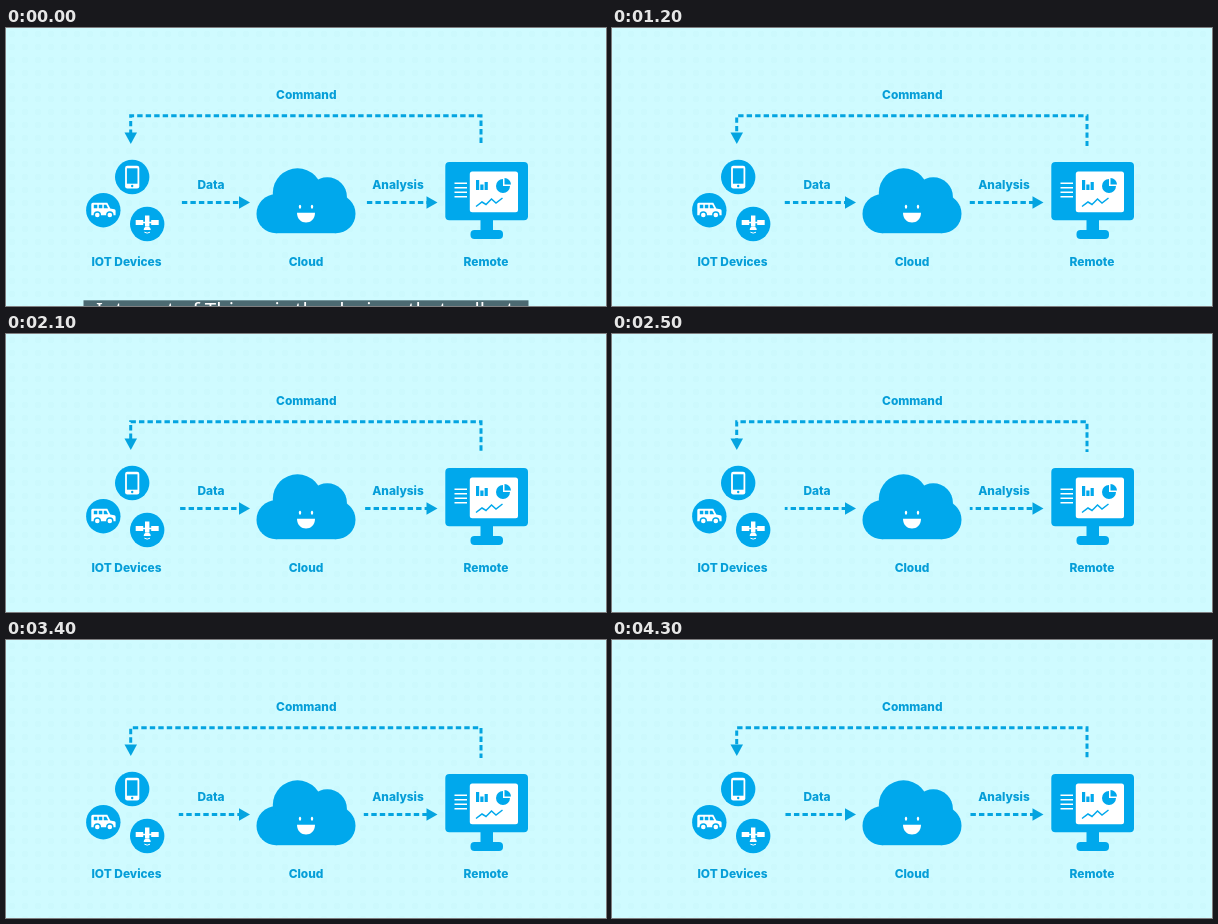
Write an HTML page that moves like this. It is 600 px wide and 278 px high and loops after 4400 ms.

```html
<!DOCTYPE html>
<html lang="en">
<head>
<meta charset="utf-8">
<title>Device data flow</title>
<style>
  :root { --blue: #00a8ec; --line: #04a4e0; --pale: #cffbff; }
  html, body { margin: 0; width: 100%; height: 100%; overflow: hidden; background: var(--pale); }
  svg { display: block; width: 100vw; height: 100vh; }
  .label { font: 800 11.9px Inter, sans-serif; fill: #069ed8; text-anchor: middle; }
  .blue { fill: var(--blue); }
  .white { fill: #fff; }
  .flow {
    fill: none; stroke: var(--line); stroke-width: 3;
    stroke-dasharray: 5.4 3.1;
    animation: flow 4.4s steps(44) infinite;
  }
  .head { fill: var(--line); }
  .caption { animation: caption 4.4s step-end infinite; }
  .caption text { font: 20.5px "Noto Sans", sans-serif; fill: #fff; }
  @keyframes flow {
    from { stroke-dashoffset: -3.1px; }
    to { stroke-dashoffset: -52.8px; }
  }
  @keyframes caption {
    0% { opacity: 1; }
    2.27%, 100% { opacity: 0; }
  }
</style>
</head>
<body>
<svg viewBox="0 0 600 278">
  <defs>
    <pattern id="weave" width="13" height="13" patternUnits="userSpaceOnUse">
      <rect x="3" y="3" width="6" height="6" rx="2" fill="#c9f7fc" opacity=".45"/>
    </pattern>
  </defs>
  <rect width="600" height="278" fill="#cffbff"/>
  <rect width="600" height="278" fill="url(#weave)"/>

  <!-- Connections -->
  <path class="flow" d="M475 118V87.8H124.7V105"/>
  <path class="flow" d="M172.8 174.5H234"/>
  <path class="flow" d="M357.8 174.5H421"/>
  <path class="head" d="M118.5 104.5H131L124.800 116z"/>
  <path class="head" d="M233 168.300v12.400l11-6.200z"/>
  <path class="head" d="M420.500 168.300v12.400l11-6.200z"/>

  <!-- Phone -->
  <g transform="translate(126.2 149)">
    <circle class="blue" r="17.2"/>
    <rect class="white" x="-7.1" y="-11.3" width="14.2" height="22.8" rx="2.2"/>
    <rect class="blue" x="-5.3" y="-8.7" width="10.6" height="15.4"/>
    <circle class="blue" cy="9" r="1.2"/>
  </g>

  <!-- Car -->
  <g transform="translate(97.3 182.2)">
    <circle class="blue" r="17.2"/>
    <path class="white" d="M-10.5-7.5H4L7-1.8 11-1q1.300.300 1.300 1.500V5H-12V-6q0-1.500 1.500-1.500z"/>
    <path class="blue" d="M-9.500-5.500h3.500v3.500h-3.500zM-4.500-5.500h3.500v3.500h-3.500zM.500-5.500h2.500l1.800 3.500H.500z"/>
    <g class="white" stroke="#00a8ec" stroke-width="1.4">
      <circle cx="-6" cy="4.800" r="3"/>
      <circle cx="6.500" cy="4.800" r="3"/>
    </g>
  </g>

  <!-- Satellite -->
  <g transform="translate(141.2 196)">
    <circle class="blue" r="17.2"/>
    <path class="white" d="M-2.200-8.500h4.400v11h-4.400zM-11.500-4h7.500v5h-7.500zM4-4h7.500v5H4zM-5-2.200H5v1.400H-5z"/>
    <path class="white" d="M-3.500 6a3.500 3.500 0 0 1 7 0z"/>
    <path d="M-2.800 8.200q2.800 1.800 5.600 0" fill="none" stroke="#fff"/>
  </g>

  <!-- Cloud -->
  <g class="blue">
    <circle cx="270" cy="185.700" r="19.500"/>
    <circle cx="291.500" cy="165" r="24.700"/>
    <circle cx="321.300" cy="168.800" r="19.600"/>
    <circle cx="330" cy="185.700" r="19.500"/>
    <rect x="270" y="166" width="60" height="39.200"/>
  </g>
  <g class="white">
    <ellipse cx="294" cy="178.700" rx="1.200" ry="2"/>
    <ellipse cx="306" cy="178.700" rx="1.200" ry="2"/>
    <path d="M291 184.700h18c0 13-18 13-18 0z"/>
  </g>

  <!-- Monitor -->
  <g class="blue">
    <rect x="439.300" y="134" width="82.700" height="58.300" rx="4"/>
    <rect x="474.500" y="192" width="12.500" height="12"/>
    <rect x="464.500" y="202" width="32.500" height="9" rx="4"/>
  </g>
  <rect class="white" x="463.800" y="143.600" width="48.200" height="40.600" rx="2.500"/>
  <path d="M448.500 155.300h12.500M448.500 159.800h12.500M448.500 164.300h12.500M448.500 168.800h12.500" stroke="#fff" stroke-width="1.6"/>
  <path class="blue" d="M470 152h3.200v10H470zM474.300 156.500h3.200v5.500h-3.200zM478.600 154h3.200v8h-3.200z"/>
  <path class="blue" d="M497 151v7h7a7 7 0 1 1-7-7zM498.500 150a6.500 6.500 0 0 1 6.500 6.500h-6.500z"/>
  <path d="M470 178.500l6-4.500 4 2.500 5.500-5.500 4.500 4 6.500-5" fill="none" stroke="#00a8ec" stroke-width="1.5"/>

  <g class="label">
    <text x="300.300" y="71">Command</text>
    <text x="205" y="161">Data</text>
    <text x="392" y="161">Analysis</text>
    <text x="120.500" y="238">IOT Devices</text>
    <text x="300" y="238">Cloud</text>
    <text x="480" y="238">Remote</text>
  </g>

  <g class="caption">
    <rect x="77.500" y="272.300" width="445" height="6" fill="#4c6a72"/>
    <text x="90" y="289">Internet of Things is the devices that collect</text>
  </g>
</svg>
</body>
</html>
```
